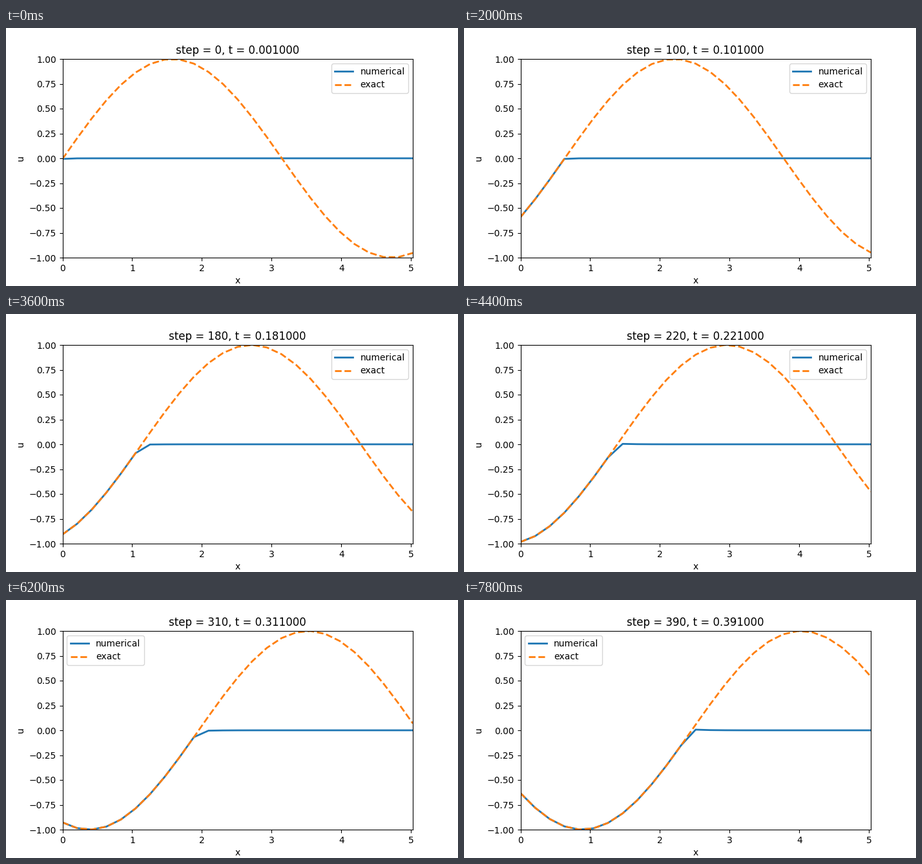
Write a matplotlib script that moves like this. It is 700 px wide and 400 px high and loops after 8000 ms.

```python
import numpy as np
import matplotlib.pyplot as plt
from matplotlib.animation import FuncAnimation

FRAMES = 40
INTERVAL = 200
STRIDE = 10
DT = 0.001
SPEED = 2 * np.pi
DX = np.pi / 15

plt.rcParams["text.kerning_factor"] = 6
x = np.arange(25) * DX


def exact(t):
    return np.sin(x - SPEED * t)


def numerical(t):
    # The wave behind its front, a small decaying ripple ahead of it.
    d = x - SPEED * t
    ripple = 0.009 * np.exp(-d / 0.18) * np.sin(2 * np.pi * d / DX)
    return np.where(d < 0, np.sin(d), ripple)


fig, ax = plt.subplots(figsize=(7, 4), dpi=100)
num_line, = ax.plot(x, numerical(DT), lw=2, label="numerical")
exact_line, = ax.plot(x, exact(DT), "--", lw=2, label="exact")
ax.set_xlim(x[0], x[-1])
ax.set_ylim(-1, 1)
ax.set_xlabel("x")
ax.set_ylabel("u")
ax.legend(loc="best")
title = ax.set_title("")


def update(frame):
    step = frame * STRIDE
    t = (step + 1) * DT
    num_line.set_ydata(numerical(t))
    exact_line.set_ydata(exact(t))
    title.set_text(f"step = {step}, t = {t:.6f}")
    return num_line, exact_line, title


anim = FuncAnimation(fig, update, frames=FRAMES, interval=INTERVAL,
                     repeat=True, repeat_delay=0, blit=False)
plt.show()
```
